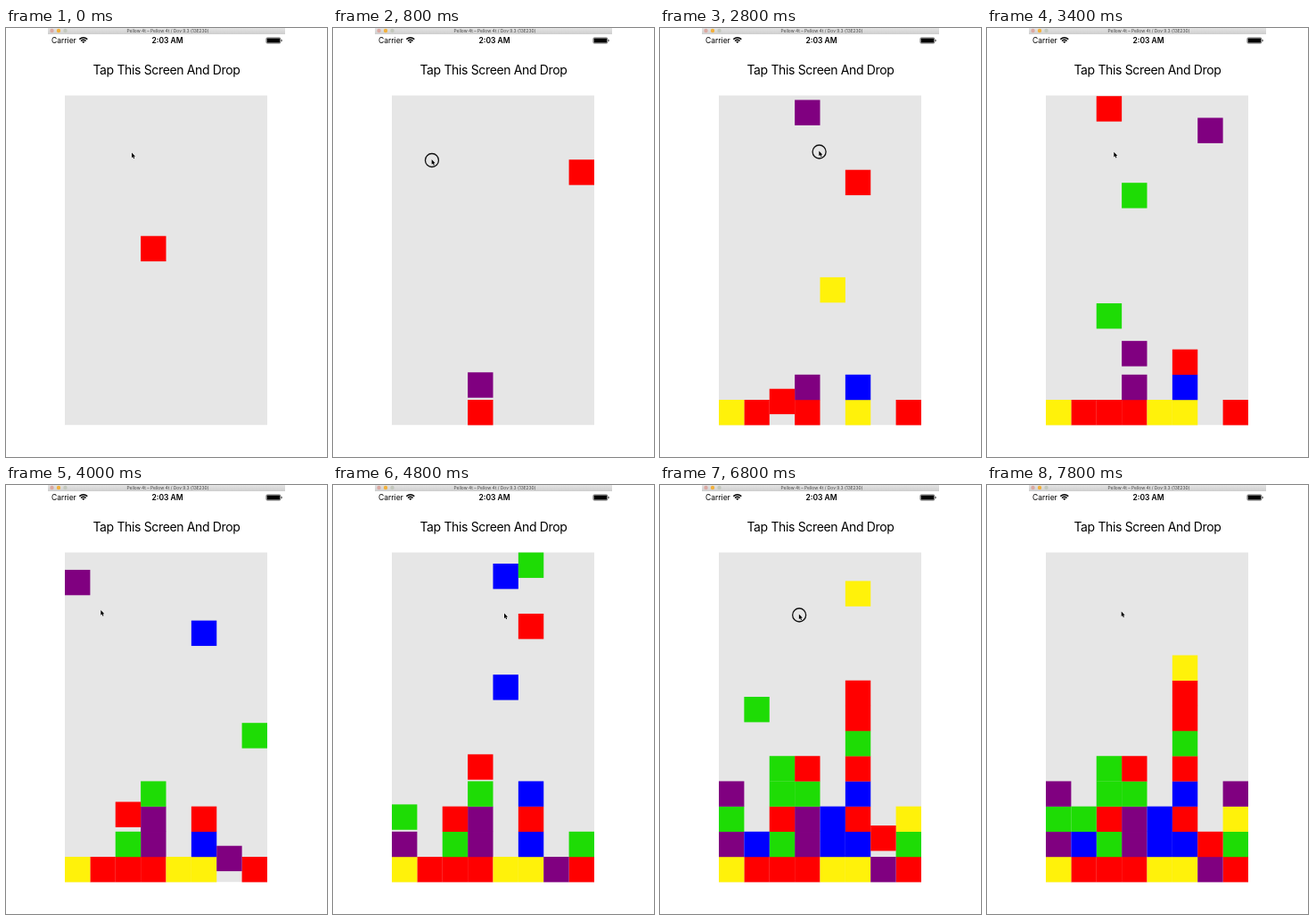
Write an HTML page that moves like this. It is 360x480 px and loops after 8000 ms.

```html
<!DOCTYPE html>
<html lang="en">
<head>
<meta charset="utf-8">
<title>Tap and Drop</title>
<style>
  html, body { margin: 0; width: 100%; height: 100%; overflow: hidden; background: #fff; }
  svg { display: block; width: 100%; height: 100%; }
  text { font-family: Inter, Roboto, sans-serif; text-anchor: middle; }
</style>
</head>
<body>
<svg viewBox="0 0 360 480">
  <defs>
    <linearGradient id="bar" x2="0" y2="1">
      <stop stop-color="#e4e4e4"/>
      <stop offset="1" stop-color="#cecece"/>
    </linearGradient>
  </defs>

  <rect x="47" width="266" height="7" fill="url(#bar)"/>
  <circle cx="51.5" cy="3" r="2.2" fill="#dba9a2"/>
  <circle cx="59" cy="3" r="2.2" fill="#f2b13c"/>
  <circle cx="66.5" cy="3" r="2.2" fill="#c3c8bd"/>
  <text x="181.5" y="4.8" font-size="4.9" fill="#444">Pellow 4t – Pellow 4t / Dov 9.3 (13E230)</text>

  <text x="51" y="17" font-size="8.5" style="text-anchor:start">Carrier</text>
  <g fill="none" stroke="#000" stroke-width="1.4">
    <path d="M82.3 12.6Q86.8 8.7 91.3 12.6M84 14.5Q86.8 12.1 89.6 14.5"/>
    <path d="M85.2 15.4Q86.8 14.3 88.4 15.4L86.8 17.1Z" fill="#000" stroke="none"/>
  </g>
  <text x="181" y="17" font-size="8.5" font-weight="600">2:03 AM</text>
  <rect x="291.9" y="10.9" width="16" height="6.2" rx="1.2" fill="none" stroke="#000" stroke-width=".5"/>
  <rect x="292.6" y="11.6" width="14.6" height="4.8" rx=".6"/>
  <path d="M308.6 12.8q1 .2 1 1.2t-1 1.2z"/>

  <text x="180" y="52" font-size="14" letter-spacing="-.35">Tap This Screen And Drop</text>
  <rect x="66" y="75.5" width="227" height="368.7" fill="#e6e6e6"/>
  <g id="blocks"></g>
  <g id="pointer">
    <circle id="press" cx=".3" cy="1" r="7.5" fill="none" stroke="#111" stroke-width="1.3"/>
    <path d="M0 0V5.7L1.3 4.6 2.2 6.7 3.2 6.3 2.3 4.2H4Z" stroke="#fff" stroke-width=".6" paint-order="stroke"/>
  </g>
</svg>
<script>
const LOOP = 8000, STEP = 200;           // the picture advances five times a second
const LEFT = 66, TOP = 75.5, FLOOR = 416, CELL = 28.37, ROW = 28.19;
const GRAVITY = 0.001595, BOUNCE = 0.19; // px per ms², share of speed kept
const PRESS_TIME = 70;
const COLORS = { r: '#f00', b: '#00f', y: '#fff20a', p: '#800080', g: '#1edc05' };

// Each drop: release time in ms, column, colour.
const drops = `-444 3r, 160 3p, 500 7r, 823 5y, 1095 5b, 1398 1r, 1710 0y, 2023 2r,
  2295 4y, 2477 5r, 2721 3p, 2860 2g, 3050 3g, 3223 6p, 3370 2r, 3511 7g, 3691 5b,
  3844 0p, 4075 3r, 4190 0g, 4386 4b, 4507 5r, 4675 4b, 4795 5g, 4890 7y, 4990 0p,
  5160 5r, 5402 5r, 5550 2g, 5727 2g, 5920 1b, 6130 6r, 6350 1g, 6600 5y, 6850 7p`;

// Pointer stops: time, x, y.
const stops = [[0, 141, 139.5], [1600, 80.3, 154.5], [2800, 178.3, 137.5], [4000, 106.3, 140],
  [4800, 192, 143.5], [5800, 161, 147.5], [7800, 150.7, 141.5], [LOOP, 150.7, 141.5]];

const byId = id => document.getElementById(id);
const stackHeights = Array(8).fill(0);

const blocks = drops.split(',').map(drop => {
  const [time, place] = drop.trim().split(' ');
  const column = +place[0];
  const rect = document.createElementNS('http://www.w3.org/2000/svg', 'rect');
  const attributes = { x: LEFT + column * CELL, width: 28.4, height: 28.4, fill: COLORS[place[1]] };
  for (const name in attributes) rect.setAttribute(name, attributes[name]);
  byId('blocks').append(rect);
  return { rect, start: +time, rest: FLOOR - ROW * stackHeights[column]++ };
});

function blockTop(age, rest) {
  const fallTime = Math.sqrt(2 * (rest - TOP) / GRAVITY);
  if (age < fallTime) return TOP + GRAVITY * age * age / 2;
  const since = age - fallTime;
  const rise = BOUNCE * GRAVITY * fallTime * since - GRAVITY * since * since / 2;
  return rest - Math.max(0, rise);
}

function pointerAt(time) {
  const next = stops.findIndex(stop => stop[0] > time);
  const [t0, x0, y0] = stops[next - 1], [t1, x1, y1] = stops[next];
  const u = (time - t0) / (t1 - t0), eased = u * u * (3 - 2 * u);
  return [x0 + (x1 - x0) * eased, y0 + (y1 - y0) * eased];
}

function draw(time) {
  for (const { rect, start, rest } of blocks) {
    rect.style.display = time < start ? 'none' : '';
    rect.setAttribute('y', blockTop(time - start, rest));
  }
  const pressed = blocks.some(({ start }) => time < start && time >= start - PRESS_TIME);
  byId('press').style.display = pressed ? '' : 'none';
  byId('pointer').setAttribute('transform', `translate(${pointerAt(time)})`);
}

const begin = performance.now();
function tick() {
  const time = (performance.now() - begin) % LOOP;
  draw(Math.floor(time / STEP) * STEP);
  requestAnimationFrame(tick);
}
tick();
</script>
</body>
</html>
```
